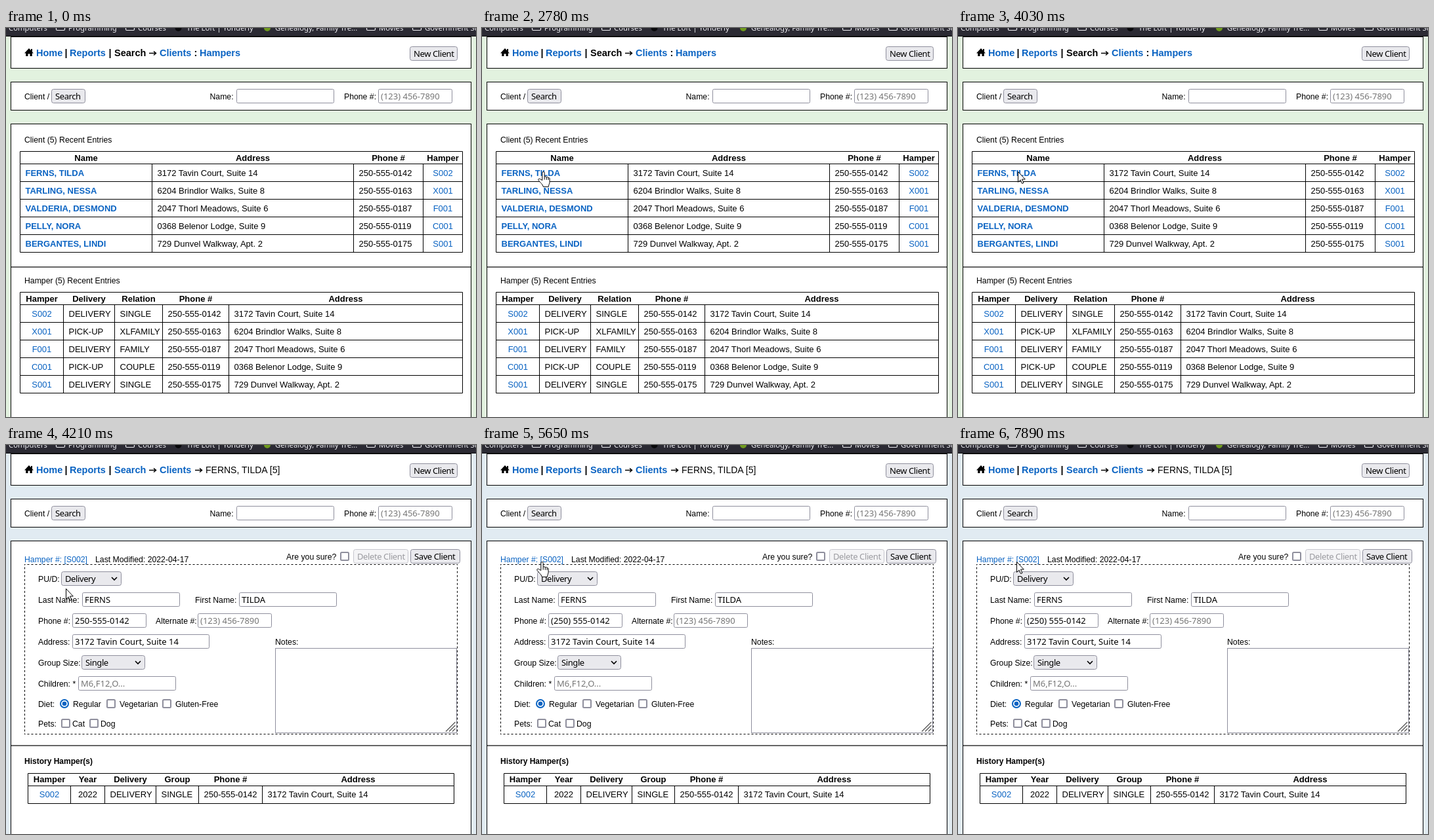
An HTML page that plays this animation: 716 by 594 pixels, repeating every 8000 ms.

```html
<!DOCTYPE html>
<html lang="en">
<head>
<meta charset="utf-8">
<title>Client and hamper records</title>
<style>
  html, body { margin: 0; width: 100%; height: 100%; overflow: hidden; }
  svg { display: block; width: 716px; height: 594px; }
  text { font: 12.25px "Liberation Sans", Arial, sans-serif; white-space: pre; }
  .cell { font-size: 13px; }
  .head { font-size: 13px; font-weight: bold; }
  .mid { text-anchor: middle; }
  .bold { font-size: 12px; font-weight: bold; }
  .nav { font-size: 14.5px; font-weight: bold; }
  .crumb { font-size: 14px; }
  .link { fill: #0a63c2; }
  .ui, .btn { font: 13px "Noto Sans", sans-serif; }
  .btn { letter-spacing: -.4px; }
  .hint { fill: #757575; }
  .off { fill: #9b9ba0; }
  .mark { font: 11.3px "Noto Sans", sans-serif; fill: #f0f0f4; }
</style>
</head>
<body>
<svg id="stage" viewBox="0 0 716 594"></svg>
<script>
const LOOP = 8000;
const stage = document.getElementById('stage');

function add(parent, tag, attrs = {}, content) {
  const el = document.createElementNS('http://www.w3.org/2000/svg', tag);
  for (const k in attrs) el.setAttribute(k, attrs[k]);
  if (content !== undefined) el.textContent = content;
  parent.appendChild(el);
  return el;
}
const group = () => add(stage, 'g');
const text = (g, x, y, s, cls = '') => add(g, 'text', { x, y, class: cls }, s);
const path = (g, d, attrs = {}) =>
  add(g, 'path', { d, fill: 'none', stroke: '#000', ...attrs });
// Box given by its outer pixel edges, with its border inside.
const box = (g, x, y, x2, y2, attrs = {}, b = 1) =>
  add(g, 'rect', { x: x + b / 2, y: y + b / 2, width: x2 - x - b, height: y2 - y - b,
    fill: '#fff', stroke: '#000', 'stroke-width': b, ...attrs });

const EDGE = { stroke: '#8f8f9d', rx: 2 };
function field(g, x, x2, y, s = '', cls = '') {
  box(g, x, y, x2, y + 22, EDGE);
  return text(g, x + 4, y + 16, s, 'ui ' + cls);
}
function button(g, x, x2, y, s, off) {
  box(g, x, y, x2, y + 22, { rx: 3, fill: off ? '#f4f4f6' : '#e9e9ed', stroke: off ? '#c7c7ce' : '#8f8f9d' });
  text(g, x + 6, y + 16, s, off ? 'btn off' : 'btn');
}
function select(g, x, x2, y, s) {
  button(g, x, x2, y, s);
  path(g, `M${x2 - 15} ${y + 9}l4 4 4-4`, { 'stroke-width': 1.6 });
}
const check = (g, x, y) => box(g, x, y, x + 14, y + 14, { ...EDGE, rx: 1.5 }, 2);

// Each column: [heading, cell class]. Only body cells have inner dividers.
function table(g, xs, top, cols, rows) {
  const line = Math.round(top) + .5;
  const bottom = line + 19 + rows.length * 27;
  const [left, right] = [xs[0], xs.at(-1)];
  let d = `M${left} ${line}H${right}V${bottom}H${left}Z`;
  for (let y = line + 19; y < bottom; y += 27) d += `M${left} ${y}H${right}`;
  for (const x of xs.slice(1, -1)) d += `M${x} ${line + 19}V${bottom}`;
  path(g, d);
  cols.forEach(([head, cls], i) => {
    const mid = (xs[i] + xs[i + 1]) / 2;
    text(g, mid, Math.round(top + 14.6), head, 'head mid');
    rows.forEach((row, j) =>
      text(g, cls.includes('mid') ? mid : xs[i] + 8, Math.round(top + 37.6 + j * 27), row[i], cls));
  });
}

const CLIENTS = [
  ['FERNS, TILDA', '3172 Tavin Court, Suite 14', '250-555-0142', 'S002', 'DELIVERY', 'SINGLE'],
  ['TARLING, NESSA', '6204 Brindlor Walks, Suite 8', '250-555-0163', 'X001', 'PICK-UP', 'XLFAMILY'],
  ['VALDERIA, DESMOND', '2047 Thorl Meadows, Suite 6', '250-555-0187', 'F001', 'DELIVERY', 'FAMILY'],
  ['PELLY, NORA', '0368 Belenor Lodge, Suite 9', '250-555-0119', 'C001', 'PICK-UP', 'COUPLE'],
  ['BERGANTES, LINDI', '729 Dunvel Walkway, Apt. 2', '250-555-0175', 'S001', 'DELIVERY', 'SINGLE']
];
const [NAME, ADDRESS, PHONE, HAMPER, DELIVERY, SIZE] = CLIENTS[0];
const [LAST, FIRST] = NAME.split(', ');
const HINT = '(123) 456-7890';
const CODE = 'cell link mid';

const arrow = (g, x) =>
  path(g, `M${x} 38.5h10M${x + 7} 35.5l3.5 3-3.5 3`, { 'stroke-width': 1.5 });

function frame(g, bg) {
  add(g, 'rect', { width: 716, height: 594, fill: bg });
  box(g, 7, 13, 709, 62);
  box(g, 7, 82, 709, 126);
  box(g, 7, 146, 709, 600);
  path(g, 'M28 38.5L35 31l3 3.2V32h2v4.4l2 2.1h-2.2V43h-3.3v-3.5h-3V43h-3.3v-4.5Z', { fill: '#000', stroke: 'none' });
  text(g, 46, 43, 'Home', 'nav link');
  text(g, 89.5, 43, '|', 'nav');
  text(g, 97, 43, 'Reports', 'nav link');
  text(g, 156.5, 43, '|', 'nav');
  arrow(g, 218);
  text(g, 234, 43, 'Clients', 'nav link');
  button(g, 615, 688, 28, 'New Client');
  text(g, 28, 109, 'Client /');
  button(g, 69, 121, 93, 'Search');
  text(g, 310.5, 109, 'Name:');
  field(g, 351, 500, 93);
  text(g, 515, 109, 'Phone #:');
  field(g, 567, 680, 93, HINT, 'hint');
}
const rule = (g, y) => path(g, `M8 ${y}H708`, { stroke: '#666', 'stroke-width': 2 });

function listPage() {
  const g = group();
  frame(g, '#e2f2df');
  text(g, 165, 43, 'Search', 'nav');
  text(g, 286.5, 43, ':', 'nav');
  text(g, 295, 43, 'Hampers', 'nav link');
  text(g, 28, 175, 'Client (5) Recent Entries');
  table(g, [21.5, 222.5, 529.5, 635.5, 695.5], 188,
    [['Name', 'head link'], ['Address', 'cell'], ['Phone #', 'cell'], ['Hamper', CODE]],
    CLIENTS);
  rule(g, 365);
  text(g, 28, 390, 'Hamper (5) Recent Entries');
  table(g, [21.5, 87.5, 165.5, 238.5, 339.5, 695.5], 403,
    [['Hamper', CODE], ['Delivery', 'cell'], ['Relation', 'cell'], ['Phone #', 'cell'], ['Address', 'cell']],
    CLIENTS.map(([, addr, phone, code, way, size]) => [code, way, size, phone, addr]));
  return g;
}

// Each side starts and ends on half a dash.
function dashedBox(g, x, y, x2, y2) {
  const dash = { 'stroke-dasharray': '3 3', 'stroke-dashoffset': 1.5 };
  for (const v of [y + .5, y2 - .5]) path(g, `M${x} ${v}H${x2}`, dash);
  const pathLength = Math.round((y2 - y) / 6) * 6;
  for (const h of [x + .5, x2 - .5]) path(g, `M${h} ${y}V${y2}`, { ...dash, pathLength });
}

function clientPage() {
  const g = group();
  frame(g, '#e1ebf2');
  text(g, 165, 43, 'Search', 'nav link');
  arrow(g, 288);
  text(g, 304, 43, NAME + ' [5]', 'crumb');
  text(g, 28, 179, `Hamper #: [${HAMPER}]`, 'link');
  text(g, 136, 179, 'Last Modified: 2022-04-17');
  text(g, 427, 175, 'Are you sure?');
  check(g, 509, 163);
  button(g, 529, 613, 159, 'Delete Client', true);
  button(g, 616, 692, 159, 'Save Client');
  dashedBox(g, 28, 182, 688, 442);

  const labels = [
    [49, 209, 'PU/D:'], [49, 241, 'Last Name:'], [288, 241, 'First Name:'],
    [49, 273, 'Phone #:'], [228, 273, 'Alternate #:'], [49, 305, 'Address:'],
    [410, 305, 'Notes:'], [49, 337, 'Group Size:'], [49, 369, 'Children: *'],
    [49, 400, 'Diet:'], [102, 400, 'Regular'], [173, 400, 'Vegetarian'],
    [258, 400, 'Gluten-Free'], [49, 430, 'Pets:'], [101, 430, 'Cat'], [144, 430, 'Dog']
  ];
  for (const [x, y, s] of labels) text(g, x, y, s);

  select(g, 84, 176, 193, 'Delivery');
  field(g, 116, 265, 225, LAST);
  field(g, 355, 504, 225, FIRST);
  const plain = field(g, 101, 214, 257, PHONE);
  const tidy = text(g, 105, 273, PHONE.replace(/^(\d+)-/, '($1) '), 'ui');
  field(g, 292, 405, 257, HINT, 'hint');
  field(g, 101, 310, 289, ADDRESS);
  select(g, 115, 212, 321, 'Single');
  field(g, 110, 259, 353, 'M6,F12,O...', 'hint');
  box(g, 410, 310, 687, 440, { stroke: '#8f8f9d' });
  path(g, 'M670 437.5l14.5-14.5M675 437.5l9.5-9.5M680 437.5l4.5-4.5', { stroke: '#555', 'stroke-width': 1.2 });
  add(g, 'circle', { cx: 89, cy: 395, r: 6, fill: '#fff', stroke: '#0a63c2', 'stroke-width': 2 });
  add(g, 'circle', { cx: 89, cy: 395, r: 3.3, fill: '#0a63c2' });
  [[153, 388], [238, 388], [84, 418], [127, 418]].forEach(([x, y]) => check(g, x, y));

  rule(g, 459);
  text(g, 28, 487, 'History Hamper(s)', 'bold');
  table(g, [33.5, 98.5, 150.5, 228.5, 293.5, 390.5, 682.5], 500.6,
    [['Hamper', CODE], ['Year', 'cell mid'], ['Delivery', 'cell'], ['Group', 'cell'], ['Phone #', 'cell'], ['Address', 'cell']],
    [[HAMPER, '2022', DELIVERY, SIZE, PHONE, ADDRESS]]);
  return { page: g, plain, tidy };
}

function bookmarks() {
  const g = group();
  add(g, 'rect', { width: 716, height: 13, fill: '#2b2a33' });
  path(g, 'M0 12.5H716', { stroke: '#0c0c0d' });
  const marks = [[4, 'Computers'], [95, 'Programming'], [201, 'Courses'], [275, 'The Loft | Yonderly'],
    [410, 'Genealogy, Family Tre...'], [568, 'Movies'], [638, 'Government Science']];
  for (const [x, s] of marks) text(g, x, 4, s, 'mark');
  for (const x of [76.5, 182.5, 549.5, 619.5])
    path(g, `M${x} -2V2q0 1.5 1.5 1.5h10q1.5 0 1.5-1.5V-2`, { stroke: '#f0f0f4', 'stroke-width': 1.2 });
  add(g, 'circle', { cx: 262.5, cy: 0, r: 5, fill: '#08080a' });
  add(g, 'circle', { cx: 398, cy: 0, r: 5, fill: '#6f9a1e' });
}

// Pointer steps: time, tip x, tip y, hand shape.
const MOVES = [
  [760, 610, 577], [960, 482, 492], [1160, 376, 432], [1360, 303, 394], [1560, 250, 370], [1760, 219, 356],
  [1980, 199, 337], [2180, 163, 299], [2380, 128, 262], [2580, 103, 234], [2780, 91, 219, true],
  [4030, 91, 219],
  [4640, 91, 214], [4840, 91, 206], [5040, 90, 198], [5240, 90, 191], [5440, 89, 185], [5650, 89, 178, true],
  [7890, 89, 178]
];

// Holds each value until the next step.
function play(el, steps) {
  const frames = steps.map(([t, props]) => ({ ...props, offset: t / LOOP, easing: 'step-end' }));
  frames.push({ ...steps.at(-1)[1], offset: 1 });
  el.animate(frames, { duration: LOOP, iterations: Infinity });
}
const swap = (before, after, t) => {
  play(before, [[0, { opacity: 1 }], [t, { opacity: 0 }]]);
  play(after, [[0, { opacity: 0 }], [t, { opacity: 1 }]]);
};
const follow = (el, isHand) =>
  play(el, [[0, { opacity: 0, transform: 'translate(0px, 0px)' }],
    ...MOVES.map(([t, x, y, hand = false]) =>
      [t, { opacity: +(hand === isHand), transform: `translate(${x}px, ${y}px)` }])]);

const list = listPage();
const client = clientPage();
bookmarks();
const skin = { fill: '#fff', 'stroke-linejoin': 'round' };
const pointer = path(group(), 'M.5.5V16.3L4.1 12.9 6.6 18.5 9 17.4 6.5 12H11.3Z', skin);
const hand = group();
path(hand, 'M.8 13.5V2.2a1.7 1.7 0 0 1 3.4 0V8.6a1.7 1.7 0 0 1 3.1.5 1.6 1.6 0 0 1 2.8.6 1.4 1.4 0 0 1 2 1.3V16c0 2.6-1.5 4-1.8 7.4H2.2C1.8 20-2 17.5-5 13.3c-1-1.5 1.1-3 2.5-1.7Z', skin);
path(hand, 'M4.2 8.6v4M7.3 9.1v3.7M10.1 9.7v3.3');

swap(list, client.page, 4210);
swap(client.plain, client.tidy, 4640);
follow(pointer, false);
follow(hand, true);
</script>
</body>
</html>
```
